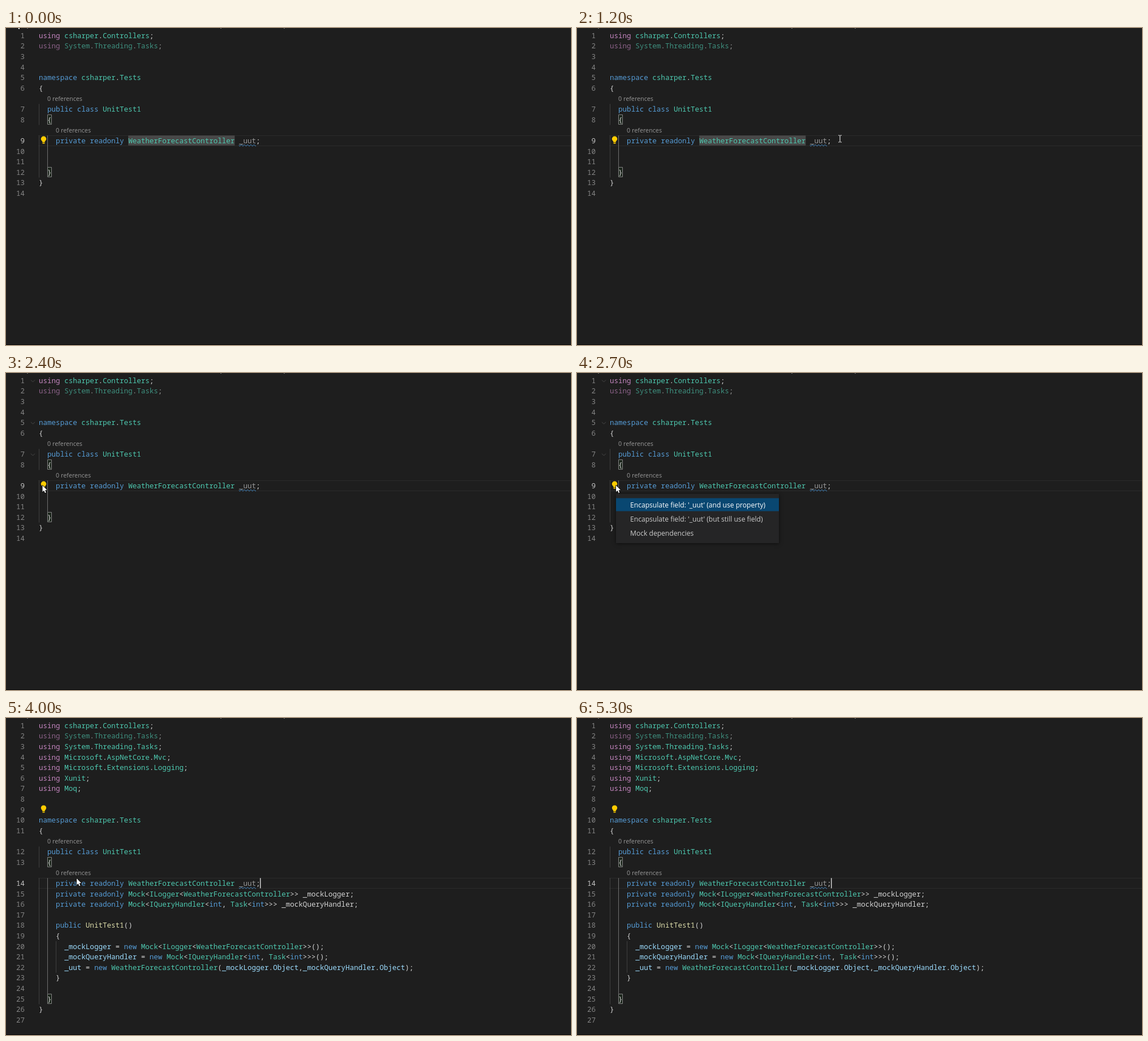
Recreate the animation shown at these times as an HTML page with a canvas. Size 999 px wide and 561 px high, loop 5500 ms.

```html
<!DOCTYPE html>
<html lang="en">
<head>
<meta charset="utf-8">
<title>Mock dependencies</title>
<style>
  html, body { margin: 0; width: 100%; height: 100%; overflow: hidden; background: #1e1e1e; }
  canvas { display: block; }
</style>
</head>
<body>
<canvas id="stage" width="999" height="561"></canvas>
<script>
const ctx = document.getElementById('stage').getContext('2d');
const LOOP = 5500, TICK = 100;
const CHAR = 7.53, LEFT = 58, PITCH = 18.61;
const CODE = '12.55px "Noto Sans Mono", monospace';
const LENS = '10.75px "Open Sans", sans-serif';
const MENU = '12.1px "Open Sans", sans-serif';
const COLOR = {
  plain: '#d4d4d4', using: '#c586c0', key: '#569cd6', type: '#4ec9b0',
  local: '#9cdcfe', method: '#dcdcaa', number: '#858585', active: '#c6c6c6'
};

// A leading "@" marks a reference lens, which has no line number.
const before = `using csharper.Controllers;
using System.Threading.Tasks;


namespace csharper.Tests
{
@  0 references
  public class UnitTest1
  {
@    0 references
    private readonly WeatherForecastController _uut;


  }
}
`.split('\n');

const after = `using csharper.Controllers;
using System.Threading.Tasks;
using System.Threading.Tasks;
using Microsoft.AspNetCore.Mvc;
using Microsoft.Extensions.Logging;
using Xunit;
using Moq;


namespace csharper.Tests
{
@  0 references
  public class UnitTest1
  {
@    0 references
    private readonly WeatherForecastController _uut;
    private readonly Mock<ILogger<WeatherForecastController>> _mockLogger;
    private readonly Mock<IQueryHandler<int, Task<int>>> _mockQueryHandler;

    public UnitTest1()
    {
      _mockLogger = new Mock<ILogger<WeatherForecastController>>();
      _mockQueryHandler = new Mock<IQueryHandler<int, Task<int>>>();
      _uut = new WeatherForecastController(_mockLogger.Object,_mockQueryHandler.Object);
    }

  }
}
`.split('\n');

// Rows are counted from zero and include the lenses; guides are [column, first, last, color].
const VIEWS = {
  before: {
    lines: before, current: 10, bulb: 10, brackets: [8, 13],
    guides: [[0, 7, 8, '#404040'], [0, 10, 13, '#404040'], [2, 10, 12, '#707070']]
  },
  after: {
    lines: after, current: 15, bulb: 8, brackets: [13, 26],
    guides: [[0, 12, 13, '#404040'], [0, 15, 26, '#404040'], [2, 15, 25, '#707070'], [4, 21, 23, '#404040']]
  }
};

const ITEMS = [
  "Encapsulate field: '_uut' (and use property)",
  "Encapsulate field: '_uut' (but still use field)",
  'Mock dependencies'
];

// Mouse path: time, x, y
const PATH = [
  [200, 18, -11], [800, 292, 175], [1200, 465, 196], [1300, 465, 196],
  [1800, 40, 198], [1900, 42, 199], [2500, 69, 199], [2800, 69, 199],
  [3100, 122, 279], [3300, 125, 284], [4300, 125, 284], [4900, 92, -22]
];

const colX = col => LEFT + col * CHAR;
const rowY = row => 13.4 + row * PITCH;
const rowTop = row => rowY(row) - PITCH / 2;
const within = (t, ...spans) => spans.some(([a, b]) => t >= a && t < b);

function rect(x, y, w, h, color) {
  ctx.fillStyle = color;
  ctx.fillRect(x, y, w, h);
}

function label(text, x, y, font, color) {
  ctx.font = font;
  ctx.fillStyle = color;
  ctx.fillText(text, x, Math.round(y));
}

function trace(points, x, y) {
  ctx.beginPath();
  points.forEach(([px, py]) => ctx.lineTo(x + px, y + py));
}

function tokenColor(word, line) {
  if (word === 'using') return COLOR.using;
  if (/^(namespace|public|class|private|readonly|new|int)$/.test(word)) return COLOR.key;
  if (word[0] === '_') {
    if (!line.includes('private')) return COLOR.local;
    return word === '_uut' ? '#979797' : COLOR.plain;
  }
  if (word === 'Object') return COLOR.local;
  if (line.includes(word + '()') && word === 'UnitTest1') return COLOR.method;
  return /^\w/.test(word) ? COLOR.type : COLOR.plain;
}

function drawLines({ lines, current }) {
  let number = 0;
  lines.forEach((line, row) => {
    const base = rowY(row) + 4.4;
    if (line[0] === '@') {
      const text = line.slice(1).trimStart();
      label(text, colX(line.length - 1 - text.length), base - 0.3, LENS, '#999999');
      return;
    }
    number++;
    ctx.textAlign = 'right';
    label(number, 33, base, CODE, row === current ? COLOR.active : COLOR.number);
    ctx.textAlign = 'left';
    ctx.globalAlpha = row === 1 ? 0.667 : 1;
    for (const m of line.matchAll(/\w+|[^\w\s]+/g)) {
      label(m[0], colX(m.index), base, CODE, tokenColor(m[0], line));
    }
    ctx.globalAlpha = 1;
  });
}

function drawSquiggle(row) {
  const y = rowY(row) + 8.2;
  ctx.beginPath();
  for (let x = colX(47); x <= colX(51); x += 0.5) {
    ctx.lineTo(x, y + 1.2 * Math.sin((x - colX(47)) * 2 * Math.PI / 5.6));
  }
  ctx.strokeStyle = '#4d9fe6';
  ctx.lineWidth = 1;
  ctx.stroke();
}

function drawBulb(row) {
  const y = rowY(row) - 3.2;
  ctx.fillStyle = '#ffcc00';
  ctx.beginPath();
  ctx.arc(66.5, y, 4.7, 0, 2 * Math.PI);
  ctx.fill();
  rect(64.2, y + 3, 4.6, 3, '#ffcc00');
  rect(64.5, y + 6.8, 4, 1.6, '#ffcc00');
}

function drawChevrons(alpha) {
  ctx.globalAlpha = alpha;
  ctx.strokeStyle = '#484848';
  ctx.lineWidth = 1;
  for (const row of [0, 4, 7]) {
    trace([[-3.5, -1.5], [0, 2], [3.5, -1.5]], 47.5, rowY(row) + 0.5);
    ctx.stroke();
  }
  ctx.globalAlpha = 1;
}

function drawEditor(view, t) {
  const top = rowTop(view.current);
  rect(57, Math.round(top - 0.2), 942, 1, '#2b2b2b');
  rect(57, Math.round(top + PITCH - 1.2), 942, 1, '#2b2b2b');
  if (t < 1400) rect(colX(21), top, 25 * CHAR, PITCH - 1, '#484848');

  for (const [col, first, last, color] of view.guides) {
    rect(Math.round(colX(col)), rowTop(first), 1, (last - first + 1) * PITCH, color);
  }
  for (const row of view.brackets) {
    const x = Math.round(colX(2)), y = Math.round(rowTop(row));
    rect(x, y, 8, 18, '#1b251b');
    ctx.strokeStyle = '#858585';
    ctx.lineWidth = 1;
    ctx.strokeRect(x + 0.5, y + 0.5, 7, 17);
  }
  drawLines(view);
  drawSquiggle(view.current);
  drawBulb(view.bulb);
  if (within(t, [1400, 2000], [2500, 2700], [3900, 4400], [4900, LOOP])) {
    rect(449, top, 1.5, PITCH - 0.5, '#d0d0d0');
  }
}

function drawMenu(selected) {
  ctx.save();
  ctx.shadowColor = 'rgba(0,0,0,.55)';
  ctx.shadowBlur = 6;
  ctx.shadowOffsetY = 1;
  rect(69, 214, 288, 87, '#252526');
  ctx.restore();
  ITEMS.forEach((text, i) => {
    const y = 222 + i * 25, on = i === selected;
    if (on) rect(69, y - 0.5, 288, 23, '#094771');
    label(text, 94, y + 16, MENU, on ? '#ffffff' : '#cccccc');
  });
}

function fillOutlined(points, x, y) {
  trace(points, x, y);
  ctx.closePath();
  ctx.lineJoin = 'round';
  ctx.lineWidth = 1.4;
  ctx.strokeStyle = '#000';
  ctx.stroke();
  ctx.fillStyle = '#fff';
  ctx.fill();
}

const CURSORS = {
  arrow(x, y) {
    fillOutlined([[0, 0], [0, 11.5], [2.6, 9.1], [4.5, 13.3], [6.4, 12.4], [4.6, 8.4], [8, 8.1]], x, y);
  },
  hand(x, y) {
    fillOutlined([[-1, 0.5], [0, -0.3], [1.2, 0.5], [1.4, 5], [4, 5], [6.5, 6], [8.6, 7],
      [8.6, 11], [7, 15.5], [0.5, 15.5], [-4, 10], [-3.6, 8.6], [-1, 9.8]], x, y);
  },
  beam(x, y) {
    rect(x - 0.6, y - 6, 1.2, 12, '#e0e0e0');
    for (const end of [-6.5, 5.5]) {
      rect(x - 3, y + end, 2.4, 1, '#e0e0e0');
      rect(x + 0.6, y + end, 2.4, 1, '#e0e0e0');
    }
  }
};

function mouseAt(t) {
  const i = PATH.findIndex(p => p[0] >= t);
  if (i < 0) return PATH[PATH.length - 1].slice(1);
  if (i === 0) return PATH[0].slice(1);
  const [t0, x0, y0] = PATH[i - 1], [t1, x1, y1] = PATH[i];
  const k = (t - t0) / (t1 - t0);
  return [x0 + (x1 - x0) * k, y0 + (y1 - y0) * k];
}

function cursorKind(t, x) {
  if (within(t, [3000, 3300])) return 'hand';
  return t < 1900 && x > 75 ? 'beam' : 'arrow';
}

function draw(t) {
  rect(0, 0, 999, 561, '#1e1e1e');
  for (const x of [37, 379, 491]) rect(x, 0, 2, 1, '#777777');

  drawEditor(t < 3900 ? VIEWS.before : VIEWS.after, t);
  if (within(t, [1700, 2900])) drawChevrons(Math.min(1, (t - 1600) / 600));
  if (within(t, [2700, 3300])) drawMenu(t < 3000 ? 0 : t < 3100 ? 1 : 2);

  const [x, y] = mouseAt(t);
  CURSORS[cursorKind(t, x)](x, y);
  rect(0, 560, 999, 1, '#080808');
}

const start = performance.now();
function frame() {
  const t = (performance.now() - start) % LOOP;
  draw(Math.floor(t / TICK) * TICK);
  requestAnimationFrame(frame);
}
frame();
</script>
</body>
</html>
```
